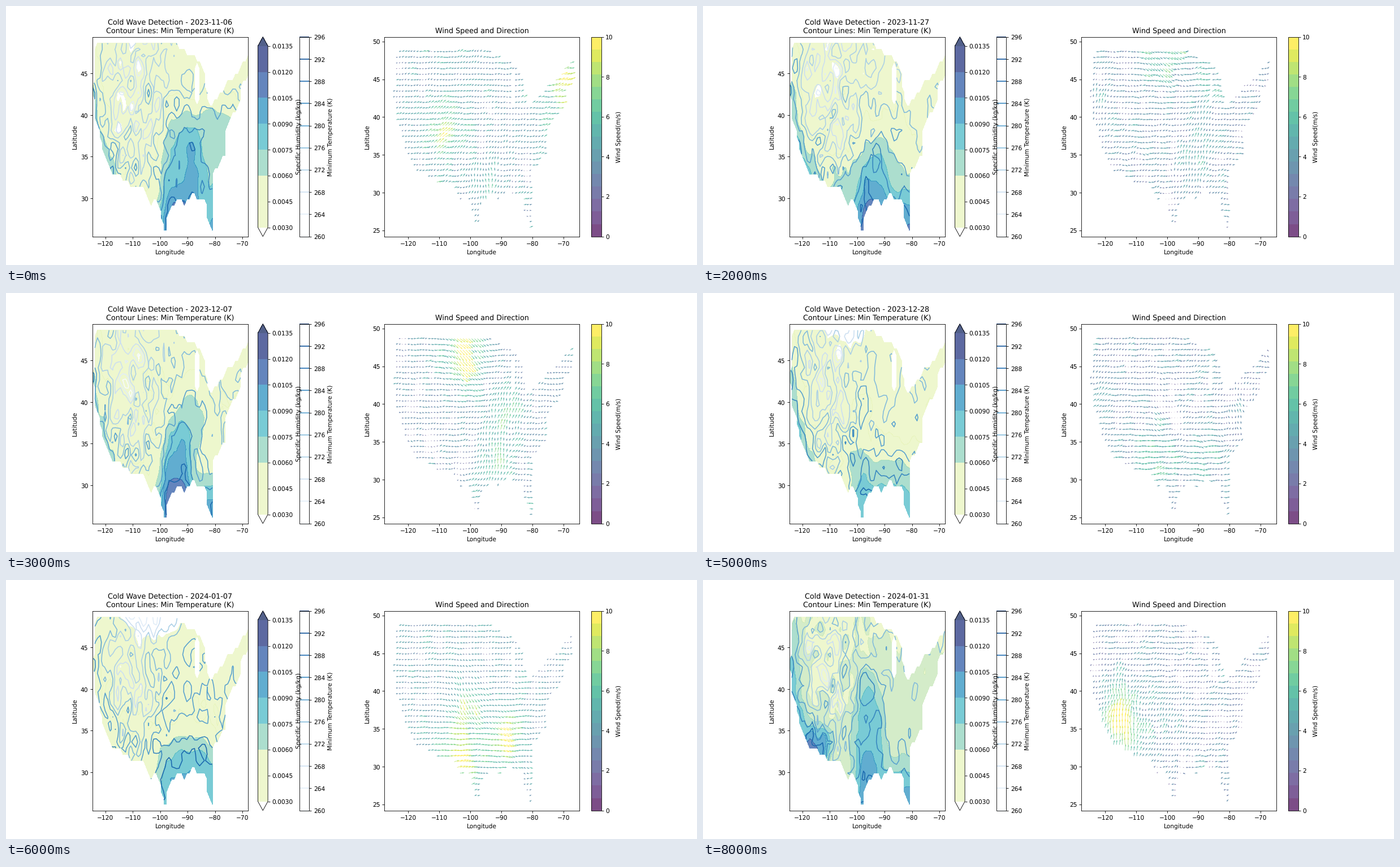
These frames come from a looping animation (1222 px wide and 458 px high, 9 s). A matplotlib script:

```python
import numpy as np
import matplotlib.pyplot as plt
from matplotlib.animation import FuncAnimation

plt.rcParams["text.hinting"] = "none"

DATES = ["2023-11-06", "2023-11-17", "2023-11-27", "2023-12-07", "2023-12-18",
         "2023-12-28", "2024-01-07", "2024-01-19", "2024-01-31"]
TWO_TONE = (4, 8)

lon = np.linspace(-124.77, -67.87, 62)
lat = 25.4 + 0.75 * np.arange(33)
LON, LAT = np.meshgrid(lon, lat)

# Key points of the southern and northern limits of the land
SOUTH = [(-124.8, 42.4), (-124, 39.6), (-120, 34.5), (-117.4, 32.8), (-114.8, 32.4),
         (-111, 31.3), (-105.8, 31), (-103.4, 29.1), (-102, 29.8), (-100.6, 28.8),
         (-98.7, 25.9), (-97.7, 26), (-96.8, 28), (-94, 29.6), (-91, 29), (-88.5, 30),
         (-83.6, 29.7), (-82.8, 27.5), (-80.9, 25.2), (-80, 33), (-76.2, 35),
         (-75.2, 39.2), (-70.9, 41), (-70, 43.3), (-67.8, 44.7)]
NORTH = [(-124.8, 43.6), (-123.8, 48.3), (-122.8, 49), (-94.6, 49), (-90.4, 47.8),
         (-87.5, 47.2), (-84, 46.2), (-82.6, 42.1), (-81.3, 41.5), (-79, 42.4),
         (-75.4, 44.3), (-71.2, 45.2), (-69.8, 46.8), (-67.8, 47.2)]

LAKE = (abs(LON + 86.55) < 0.45) & (LAT > 41.8) & (LAT < 45.9)
LAND = (LAT > np.interp(LON, *zip(*SOUTH))) & (LAT < np.interp(LON, *zip(*NORTH))) & ~LAKE


def radius2(x, y, w, h):
    return ((LON - x) / w) ** 2 + ((LAT - y) / h) ** 2


def bump(x, y, w, h):
    return np.exp(-radius2(x, y, w, h) / 2)


def plateau(x, y, w, h):
    return np.exp(-radius2(x, y, w, h) ** 2 / 2)


def noise(rng):
    z = rng.standard_normal(LON.shape)
    for axis in (0, 1):
        z = (np.roll(z, 1, axis) + 2 * z + np.roll(z, -1, axis)) / 4
    return z / z.std()


ROCKIES = bump(-110, 42, 6, 6)
RUGGED = 0.35 + bump(-111, 40, 9, 9)
RIDGES = noise(np.random.default_rng(7))
GULF = np.exp(-((LAT - 26) / 3.2) ** 2 / 2) / (1 + np.exp(-101 - LON))
SHORE = -124 + np.maximum(39 - LAT, 0)
PACIFIC = np.exp(-((LON - SHORE) / 2.4) ** 2 / 2 - ((LAT - 38) / 7) ** 2 / 2)


def scene(base, gulf, pacific, air, flow, jets, warm=0, chill=4):
    """Moisture (g/kg), temperature offset (K) and wind (m/s).
    air: (lon, lat, width, height, amount); jets: (lon, lat, u, v)."""
    q = base - 0.05 * (LAT - 37) - 0.6 * ROCKIES + gulf * GULF + pacific * PACIFIC
    q = q + sum(amount * plateau(*place) for *place, amount in air)
    u, v = (f + sum(jet[k] * bump(*jet[:2], 4.5, 3.2) for jet in jets)
            for f, k in zip(flow, (2, 3)))
    return np.array([q, warm - chill * ROCKIES, u, v])


states = {
    0: scene(4.3, 4.5, 2.5, [(-92.3, 33, 6.3, 6.5, 3.6), (-80, 36, 9, 5.5, 2.4)],
             (3.4, 1.4), [(-71, 44, 5, 1.5), (-109, 38, 3, 2.5), (-95, 31, -3, 4)]),
    1: scene(4.2, 3.2, 4, [(-100, 28, 30, 6.5, 3.6), (-92, 45, 6, 6, -1.4)],
             (2.8, 0.8), [(-122, 40, -2, 6), (-87, 45, 5, 0.5), (-92, 35, -2, 3)]),
    3: scene(4.6, 5, 2, [(-94, 32, 4.5, 5.5, 4), (-88, 38, 4.5, 4.2, 1.8)],
             (3.2, 0.4), [(-102, 47, 4, -8), (-88, 39, -2, 6), (-93, 32, -2, 6)], chill=7),
    4: scene(4.4, 3, 5.5, [(-100, 34, 3.5, 6, 2.4), (-89, 44, 4, 4, -1.7)],
             (2.8, 0.8), [(-122, 41, -1, 5.5), (-97, 38, -2, 5), (-76, 39, -7, 4)]),
    6: scene(4.4, 3.5, 1, [(-90, 31, 9.5, 3.2, 2.6), (-102, 49, 9, 2.5, -1.8)],
             (3.6, 0.8), [(-104, 33, 6.5, 1.5), (-102, 38.5, -2, -8), (-89, 34, 4.5, -4)],
             warm=4, chill=8),
    8: scene(5, 4.5, 4, [(-96, 35, 5, 6, 3.2), (-114, 33.3, 4, 2.2, 4.2)],
             (2.6, 0.8), [(-116, 38, -2, 6.5), (-113, 33, -2, 6), (-99, 36, -1, 3)]),
}
for n in (2, 5, 7):
    states[n] = (states[n - 1] + states[n + 1]) / 2


def weather(n):
    rng = np.random.default_rng(40 + n)
    q, offset, u, v = states[n]
    q = np.maximum(q + RUGGED * (0.28 * noise(rng) + 0.2 * RIDGES), 1.5)
    temp = 270.5 + 14.5 * np.log(q / 3) + offset
    temp = temp + RUGGED * (1.6 * RIDGES + 1.3 * noise(rng)) + 0.4 * noise(rng)
    u, v = u + 0.9 * noise(rng), v + 0.9 * noise(rng)
    hide = lambda a: np.ma.masked_where(~LAND, a)
    return hide(q / 1000), hide(temp), u[LAND], v[LAND]


q_levels = np.arange(3, 14, 1.5) / 1000
t_levels = np.arange(260, 297, 4)
bands = [plt.cm.YlGnBu((k + 0.5) / 7) for k in range(2, 7)]
PALE = ["#ffffff", "#e7f5ba", "#e6f4b8"] + bands + [plt.cm.YlGnBu(1.0)]
GREENER = PALE[:2] + ["#c3e5b2"] + PALE[3:]

fig, (ax, wx) = plt.subplots(1, 2, figsize=(16, 6), dpi=76.375)
drawn = []


def draw_map(n):
    while drawn:
        drawn.pop().remove()
    q, temp, u, v = weather(n)
    fill = ax.contourf(lon, lat, q, levels=q_levels, extend="both", alpha=0.7,
                       colors=GREENER if n in TWO_TONE else PALE)
    lines = ax.contour(lon, lat, temp, levels=t_levels, cmap="Blues")
    drawn.extend([fill, lines])
    ax.set_title(f"Cold Wave Detection - {DATES[n]}\nContour Lines: Min Temperature (K)")
    return u, v


u, v = draw_map(0)
fill, lines = drawn
fig.colorbar(lines, ax=ax, label="Minimum Temperature (K)")
fig.colorbar(fill, ax=ax, label="Specific Humidity (kg/kg)")
ax.set(xlim=(-124.77, -67.87), ylim=(25.4, 49.4), xlabel="Longitude", ylabel="Latitude")

arrows = wx.quiver(LON[LAND], LAT[LAND], u, v, np.hypot(u, v), scale=260, width=0.0024,
                   cmap=plt.get_cmap("viridis", 16), clim=(0, 10), alpha=0.7)
fig.colorbar(arrows, ax=wx, label="Wind Speed(m/s)")
wx.set(xlim=(-127.6, -65), ylim=(24.2, 50.6), xlabel="Longitude", ylabel="Latitude",
       title="Wind Speed and Direction")


def update(n):
    u, v = draw_map(n)
    speed = np.hypot(u, v)
    arrows.scale = 1.8 * speed.mean() * np.sqrt(speed.size)
    arrows.set_UVC(u, v, speed)
    return drawn + [arrows]


anim = FuncAnimation(fig, update, frames=len(DATES), interval=1000,
                     init_func=lambda: update(0), repeat=True, repeat_delay=0)
plt.show()
```
